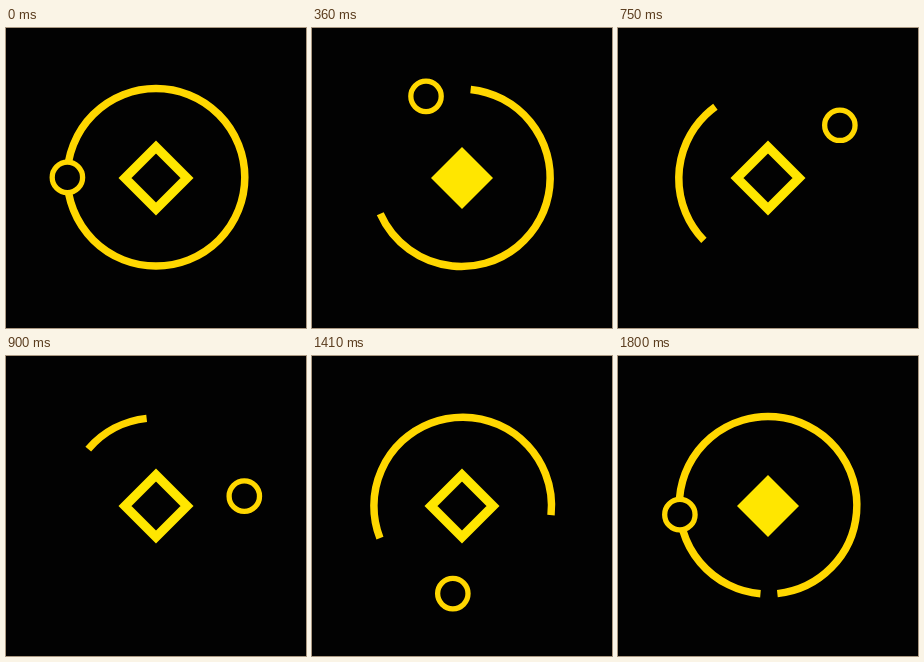
Recreate the animation shown at these times as an HTML page with a canvas. Size 300 by 300 pixels, loop 1830 ms.

```html
<!DOCTYPE html>
<html lang="en">
<head>
<meta charset="utf-8">
<title>Orbit loader</title>
<style>
  html, body { margin: 0; width: 100%; height: 100%; overflow: hidden; background: #020202; }
  canvas { display: block; width: 100vmin; height: 100vmin; }
</style>
</head>
<body>
<canvas id="stage" width="300" height="300"></canvas>
<script>
const canvas = document.getElementById('stage');
const ctx = canvas.getContext('2d');
const SIZE = 300, LOOP = 1830, TICK = 30, TICKS = 60;
const BG = '#020202', GOLD = '#ffd700', LEMON = '#ffe600';
const rad = deg => deg * Math.PI / 180;

function fit() {
  const side = Math.min(innerWidth, innerHeight) * (window.devicePixelRatio || 1);
  canvas.width = canvas.height = Math.max(1, Math.round(side));
}

function strokeArc(x, y, r, from, to, width, fill) {
  ctx.beginPath();
  ctx.arc(x, y, r, rad(from), rad(to));
  if (fill) {
    ctx.fillStyle = fill;
    ctx.fill();
  }
  ctx.strokeStyle = GOLD;
  ctx.lineWidth = width;
  ctx.stroke();
}

// The leading end turns steadily while the arc shortens, then grows again.
function drawRing(n) {
  const wobble = rad(270 - 6 * n);
  const length = 360 - (30 - Math.abs(n - 30)) * 360 / 33;
  const end = 90 + 6 * n;
  strokeArc(150 + 0.7 * Math.cos(wobble), 150 + 0.7 * Math.sin(wobble),
    88.8, end - length, end, 7.5);
}

function drawMoon(n) {
  const a = rad(180 + 6 * n);
  strokeArc(150.1 + 88.7 * Math.cos(a), 149.4 + 88.7 * Math.sin(a),
    15.2, 0, 360, 5.3, BG);
}

// Alternates between outline and solid every ten ticks.
function drawDiamond(n) {
  const h = 31;
  ctx.beginPath();
  ctx.moveTo(150, 150 - h);
  ctx.lineTo(150 + h, 150);
  ctx.lineTo(150, 150 + h);
  ctx.lineTo(150 - h, 150);
  ctx.closePath();
  if (Math.floor(n / 10) % 2) {
    ctx.fillStyle = LEMON;
    ctx.fill();
  } else {
    ctx.strokeStyle = LEMON;
    ctx.lineWidth = 9.2;
    ctx.stroke();
  }
}

function draw(ms) {
  // The first pose is held for two ticks.
  const n = Math.min(TICKS - 1, Math.max(0, Math.floor((ms % LOOP) / TICK) - 1));
  const k = canvas.width / SIZE;
  ctx.setTransform(k, 0, 0, k, 0, 0);
  ctx.fillStyle = BG;
  ctx.fillRect(0, 0, SIZE, SIZE);
  drawRing(n);
  drawMoon(n);
  drawDiamond(n);
}

const start = performance.now();
function loop() {
  draw(performance.now() - start);
  requestAnimationFrame(loop);
}
addEventListener('resize', fit);
fit();
loop();
</script>
</body>
</html>
```
